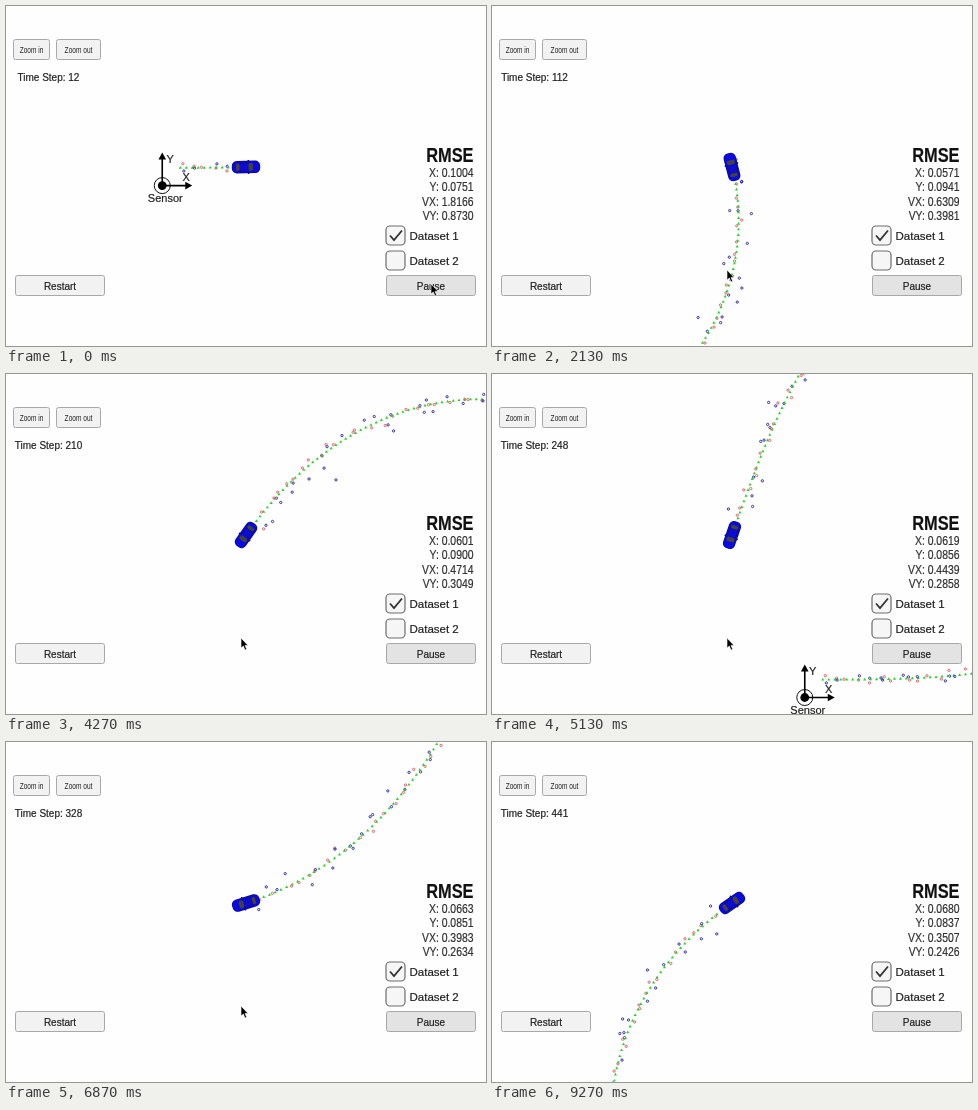
Write an HTML page with a canvas that moves like this. It is 480 by 340 pixels and loops after 9340 ms.

```html
<!DOCTYPE html>
<html lang="en">
<head>
<meta charset="utf-8">
<title>Tracking simulator</title>
<style>
  html, body { margin: 0; width: 100%; height: 100%; overflow: hidden; background: #fefefe; }
  canvas, svg { position: absolute; left: 0; top: 0; width: 480px; height: 340px; }
  text { font-family: "Liberation Sans", Arial, sans-serif; font-size: 10px; fill: #222; stroke: #222; stroke-width: .2; text-anchor: middle; }
  .button { fill: #f2f2f2; stroke: #a8a8a8; }
  .active { fill: #e3e3e3; }
  .box { fill: #f6f6f6; stroke: #6c6c6c; stroke-width: 1.2; }
  .label { font-size: 11.5px; text-anchor: start; }
  .small { font-size: 9.4px; stroke: none; }
  .value { font-size: 13px; text-anchor: end; fill: #333; }
  .title { font-size: 20.5px; font-weight: bold; text-anchor: end; fill: #111; }
  .axis { font-size: 11px; }
</style>
</head>
<body>
<canvas id="world" width="480" height="340"></canvas>
<svg viewBox="0 0 480 340">
  <g id="sensor">
    <circle r="8" fill="none" stroke="#111"/>
    <circle r="4.4"/>
    <path d="M0 0V-28M0 0H25" stroke="#000" stroke-width="1.6"/>
    <path d="M0-33L3.8-26H-3.8ZM30 0L23-3.8V3.8Z"/>
    <text class="axis" x="8" y="-23">Y</text>
    <text class="axis" x="24" y="-5">X</text>
    <text class="axis" x="3" y="16">Sensor</text>
  </g>
  <rect class="button" x="7.5" y="33.5" width="36" height="20" rx="2"/>
  <rect class="button" x="50.5" y="33.5" width="44" height="20" rx="2"/>
  <text class="small" transform="translate(25.5 46.6) scale(.7 1)">Zoom in</text>
  <text class="small" transform="translate(72.5 46.6) scale(.7 1)">Zoom out</text>
  <text id="step" x="42.5" y="75"></text>

  <g transform="translate(467.5 0) scale(.8 1)">
    <text class="title" y="156.5">RMSE</text>
    <text class="value" y="171"></text>
    <text class="value" y="185"></text>
    <text class="value" y="200"></text>
    <text class="value" y="214"></text>
  </g>

  <rect class="box" x="380" y="220" width="19" height="19" rx="4"/>
  <rect class="box" x="380" y="245" width="19" height="19" rx="4"/>
  <path d="M384 229.5L388 234L396 224.5" fill="none" stroke="#333" stroke-width="1.8"/>
  <text class="label" x="403.5" y="233.5">Dataset 1</text>
  <text class="label" x="403.5" y="258.5">Dataset 2</text>

  <rect class="button" x="9.5" y="269.5" width="89" height="20" rx="2"/>
  <rect class="button active" x="380.5" y="269.5" width="89" height="20" rx="2"/>
  <text x="54" y="283.5">Restart</text>
  <text x="425" y="283.5">Pause</text>
  <path id="cursor" d="M0 0V10L2.3 8L4 12L5.7 11.2L4 7.4H7Z" stroke="#fff" stroke-width=".6"/>
</svg>
<script>
const LOOP = 9340, FRAME = 200 / 3, LAST = 139;
const CAR = { x: 240, y: 161 };
const START = { x: 12, y: -18 };   // relative to the sensor
const SPEED = 6, PERIOD = 502, SWING = 125.5 * Math.PI / 180;
const NAMES = ['X', 'Y', 'VX', 'VY'];
// Readings on the panel: time in ms, step, then the four errors
const READINGS = [
  [0, 12, .1004, .0751, 1.8166, .8730],
  [1200, 68, .0597, .0992, .8042, .4958],
  [3070, 156, .0557, .0914, .5376, .3454],
  [4270, 210, .0601, .0900, .4714, .3049],
  [5930, 284, .0633, .0823, .4231, .2714],
  [7800, 371, .0687, .0874, .3785, .2570],
  [9270, 441, .0680, .0837, .3507, .2426]
];

const $ = s => document.querySelector(s);
const ctx = $('#world').getContext('2d');
const values = document.querySelectorAll('.value');

const mix = (a, b, u) => a + (b - a) * u;

function ease(from, to, t) {
  const u = Math.min(1, Math.max(0, (t - from) / (to - from)));
  return u * u * (3 - 2 * u);
}

// The heading swings back and forth, which bends the route into a figure eight
const phase = k => 2 * Math.PI * k / PERIOD;
const heading = k => SWING * (1 - Math.cos(phase(k)));

function drive(p, k) {
  const v = SPEED * (1 - .05 * Math.sin(phase(k))), a = heading(k + .5);
  return { x: p.x + v * Math.cos(a), y: p.y - v * Math.sin(a) };
}

function rand(n) {
  const v = Math.sin(n * 12.9898 + 4.1) * 43758.5453;
  return v - Math.floor(v);
}

const gauss = n => Math.sqrt(-2 * Math.log(rand(n) + 1e-6)) * Math.cos(2 * Math.PI * rand(n + .37));

// Lidar scatters evenly, radar mostly across its line of sight
function measure(p, k) {
  const a = gauss(k), b = gauss(k + 900);
  if (k % 2) return { x: p.x + 3 * a, y: p.y + 3 * b };
  const out = 6 * a / Math.hypot(p.x, p.y), side = .025 * b;
  return { x: p.x * (1 + out) - p.y * side, y: p.y * (1 + out) + p.x * side };
}

const route = [START];
while (route.length < 442) route.push(drive(route.at(-1), route.length - 1));
const hits = route.map(measure);

function ring(p, color) {
  ctx.strokeStyle = color;
  ctx.beginPath();
  ctx.arc(p.x, p.y, 1.15, 0, 7);
  ctx.stroke();
}

function triangle(p) {
  ctx.beginPath();
  ctx.moveTo(p.x, p.y - 1.6);
  ctx.lineTo(p.x + 1.5, p.y + 1.1);
  ctx.lineTo(p.x - 1.5, p.y + 1.1);
  ctx.fill();
}

function shape(color, x, y, w, h, r) {
  ctx.fillStyle = color;
  ctx.beginPath();
  ctx.roundRect(x, y, w, h, r);
  ctx.fill();
}

function drawCar(angle) {
  ctx.save();
  ctx.translate(CAR.x, CAR.y);
  ctx.rotate(-angle);
  shape('#080850', 1.5, -7, 2, 14, 1);
  shape('#0808a0', -14.2, -6.2, 28.4, 12.4, 5);
  shape('#0a0ae0', -13.6, -5.4, 27.2, 10.8, 4.5);
  shape('#10107c', -8, -4.6, 12, 9.2, 2);
  shape('#0c0cd2', -6, -3.8, 9, 7.6, 1.5);
  shape('#45423c', 2.5, -4, 4.5, 8, 1.8);
  shape('#45423c', -10, -3.6, 3.6, 7.2, 1.4);
  ctx.restore();
}

function drawWorld(k) {
  const ox = CAR.x - route[k].x, oy = CAR.y - route[k].y;
  ctx.clearRect(0, 0, 480, 340);
  ctx.save();
  ctx.translate(ox, oy);
  ctx.lineWidth = .9;
  ctx.fillStyle = '#22d322';
  for (let i = 1; i <= k; i++) {
    ring(hits[i], i % 2 ? '#e05560' : '#2020a8');
    triangle(route[i]);
  }
  ctx.restore();
  drawCar(heading(k));
  $('#sensor').setAttribute('transform', `translate(${ox} ${oy})`);
}

function drawPanel(k, from, to) {
  const decay = n => 1 / Math.sqrt(n);
  const u = (decay(k) - decay(from[1])) / (decay(to[1]) - decay(from[1]));
  $('#step').textContent = 'Time Step: ' + k;
  values.forEach((el, n) => {
    el.textContent = NAMES[n] + ': ' + mix(from[n + 2], to[n + 2], u).toFixed(4);
  });
}

function moveCursor(t) {
  const go = ease(250, 900, t), nudge = ease(7200, 7300, t), leave = ease(8250, 8500, t);
  const x = 425 - 190 * go - 3 * nudge - 7 * leave;
  const y = 278 - 14 * go + 81 * leave;
  $('#cursor').setAttribute('transform', `translate(${x} ${y})`);
}

function draw(t) {
  const next = Math.max(1, READINGS.findIndex(r => r[0] >= t));
  const from = READINGS[next - 1], to = READINGS[next];
  const k = Math.round(mix(from[1], to[1], (t - from[0]) / (to[0] - from[0])));
  drawWorld(k);
  drawPanel(k, from, to);
  moveCursor(t);
}

let shown = -1;
function tick(now) {
  const frame = Math.min(LAST, Math.floor((now % LOOP + 4) / FRAME));
  if (frame !== shown) {
    shown = frame;
    draw(Math.round(frame * FRAME / 10) * 10);
  }
  requestAnimationFrame(tick);
}
tick(performance.now());
</script>
</body>
</html>
```
